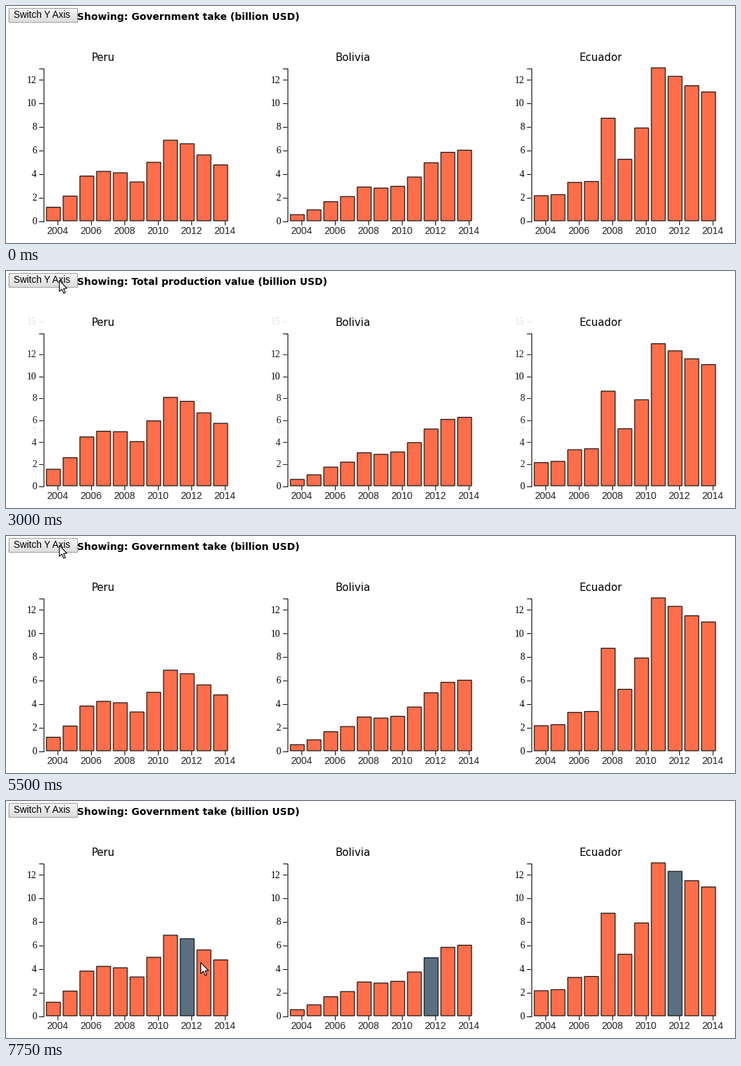
These frames come from a looping animation (1046 by 341 pixels, 8 s). A matplotlib script:

```python
import numpy as np
import matplotlib.pyplot as plt
from matplotlib.animation import FuncAnimation
from matplotlib.patches import Polygon, Rectangle

W, H, DPI = 1046, 341, 64
PT = 72 / DPI                     # points per pixel
STEP, LOOP = 250, 8000
BASE, TALL = 309, 220             # baseline and height of each chart
CORAL = np.array([255, 110, 74]) / 255
SLATE = np.array([90, 112, 130]) / 255
TAKE_MAX, TOTAL_MAX = 13.0, 34.55
TAKE_TICKS, TOTAL_TICKS = range(0, 13, 2), range(0, 31, 5)

# name, government take, total production value (2004 to 2014)
COUNTRIES = [
    ("Peru",
     [1.15, 2.1, 3.8, 4.2, 4.08, 3.3, 4.97, 6.85, 6.55, 5.6, 4.75],
     [9.35, 12.6, 18.75, 21.9, 23.6, 19.95, 26.7, 34.55, 32.95, 29.7, 26.4]),
    ("Bolivia",
     [0.52, 0.93, 1.62, 2.06, 2.87, 2.78, 2.93, 3.72, 4.93, 5.82, 6.0],
     [1.88, 2.5, 3.5, 4.25, 6.05, 4.75, 6.36, 8.65, 10.55, 11.15, 11.53]),
    ("Ecuador",
     [2.13, 2.22, 3.26, 3.34, 8.72, 5.23, 7.89, 13.0, 12.28, 11.48, 10.95],
     [1.68, 2.35, 3.82, 4.08, 6.5, 4.55, 6.8, 11.85, 12.75, 13.55, 13.1]),
]

# cursor path: time, x, y
PATH = np.array([
    (500, 283, 262), (750, 262, 222), (1000, 190, 125), (1250, 100, 32),
    (1500, 76, 13), (5500, 76, 13), (5750, 98, 45), (6000, 210, 185),
    (6250, 232, 218), (6500, 235, 220), (6750, 241, 222), (7000, 255, 226),
    (7250, 261, 228), (7500, 261, 228), (7750, 279, 232)])
# hovered year: bar index, enter, leave
HOVERS = [(9, 400, 640), (8, 640, 760), (7, 6013, 6800),
          (8, 6800, 7750), (9, 7750, 9000)]
ARROW = np.array([(0.5, 0.5), (0.5, 16.5), (4.2, 13), (6.8, 19),
                  (9.2, 18), (6.6, 12.2), (11.5, 12)])


def ease(p):
    p = min(max(p, 0), 1)
    return 4 * p ** 3 if p < 0.5 else 1 - 4 * (1 - p) ** 3


def mix_at(t):
    """0 shows government take, 1 shows total production value."""
    return ease((t - 2700) / 1000) - ease((t - 4545) / 1000)


def hover_at(bar, t):
    level = 0
    for i, enter, leave in HOVERS:
        if i == bar:
            level += ease((t - enter) / 400) - ease((t - leave) / 400)
    return level


fig = plt.figure(figsize=(W / DPI, H / DPI), dpi=DPI, facecolor="white")
ax = fig.add_axes([0, 0, 1, 1])


def text(x, y, s, size, font="DejaVu Sans", **kw):
    return ax.text(x, y, s, fontsize=size * PT, family=font,
                   va="baseline", **kw)


def line(xs, ys, **kw):
    return ax.plot(xs, ys, color="black", lw=PT, solid_capstyle="butt",
                   **kw)[0]


class Chart:
    def __init__(self, x, name, take, total):
        self.x = x
        self.take = TALL * np.array(take) / TAKE_MAX
        self.total = TALL * np.array(total) / TOTAL_MAX
        text(x + 69.5, 79, name, 15)
        line([x - 6, x + .5, x + .5, x - 6],
             [BASE - TALL + .5] * 2 + [BASE + .5] * 2)
        for k in range(6):
            cx = x + 20.5 + 48 * k
            line([cx, cx], [BASE, BASE + 6])
            text(cx, 328, str(2004 + 2 * k), 14, "Liberation Sans",
                 ha="center", color="#222222")
        self.bars = [ax.add_patch(Rectangle(
            (x + 5 + 24 * i, BASE), 20, 0, ec="#111111", lw=1.2 * PT,
            snap=False, zorder=3)) for i in range(len(take))]
        self.ticks = []
        for v in sorted({*TAKE_TICKS, *TOTAL_TICKS}):
            mark = line([x - 6, x], [0, 0])
            label = text(x - 9, 0, str(v), 14, "Liberation Serif", ha="right")
            for part in (mark, label):
                part.set_clip_path(plot_area)
            self.ticks.append((v, mark, label))

    def draw(self, t):
        m = mix_at(t)
        heights = self.take * (1 - m) + self.total * m
        for i, (bar, h) in enumerate(zip(self.bars, heights)):
            bar.set_y(BASE - h)
            bar.set_height(h)
            level = hover_at(i, t)
            bar.set_facecolor(CORAL * (1 - level) + SLATE * level)
        unit = TALL * ((1 - m) / TAKE_MAX + m / TOTAL_MAX)
        for v, mark, label in self.ticks:
            alpha = (v in TAKE_TICKS) * (1 - m) + (v in TOTAL_TICKS) * m
            y = BASE - v * unit
            row = np.floor(y) + .5
            mark.set_ydata([row, row])
            label.set_y(y + 4.7)
            for part in (mark, label):
                part.set_alpha(min(max(alpha, 0), 1))
                part.set_visible(alpha > 0.005 and y > 40)


plot_area = Rectangle((0, 49), W, H - 49, transform=ax.transData)
charts = [Chart(53 + 350 * k, *row) for k, row in enumerate(COUNTRIES)]

shade = np.linspace(0.965, 0.865, 20)[:, None]
face = ax.imshow(shade, cmap="gray", vmin=0, vmax=1, aspect="auto",
                 extent=(3, 102, 23, 2), interpolation="bilinear")
ax.add_patch(Rectangle((3.5, 2.5), 98, 20, fill=False, ec="#a0a0a0", lw=PT))
text(11, 17, "Switch Y Axis", 13.6, "Liberation Sans")
title = text(102, 20, "", 14.05, weight="bold")
cursor = ax.add_patch(Polygon(ARROW, closed=True, fc="white", ec="black",
                              lw=1.1 * PT, zorder=9))

ax.set_xlim(0, W)
ax.set_ylim(H, 0)
ax.axis("off")


def update(i):
    t = i * STEP
    for chart in charts:
        chart.draw(t)
    total = 2750 <= t < 4750
    what = "Total production value" if total else "Government take"
    title.set_text(f"Showing: {what} (billion USD)")
    face.set_data(shade[::-1] if t == 4500 else shade)
    tip = [np.interp(t, PATH[:, 0], PATH[:, k]) for k in (1, 2)]
    cursor.set_xy(ARROW + np.round(tip))
    cursor.set_visible(t >= PATH[0, 0])
    return []


anim = FuncAnimation(fig, update, frames=LOOP // STEP, interval=STEP,
                     init_func=lambda: update(0), repeat=True, repeat_delay=0)
plt.show()
```
